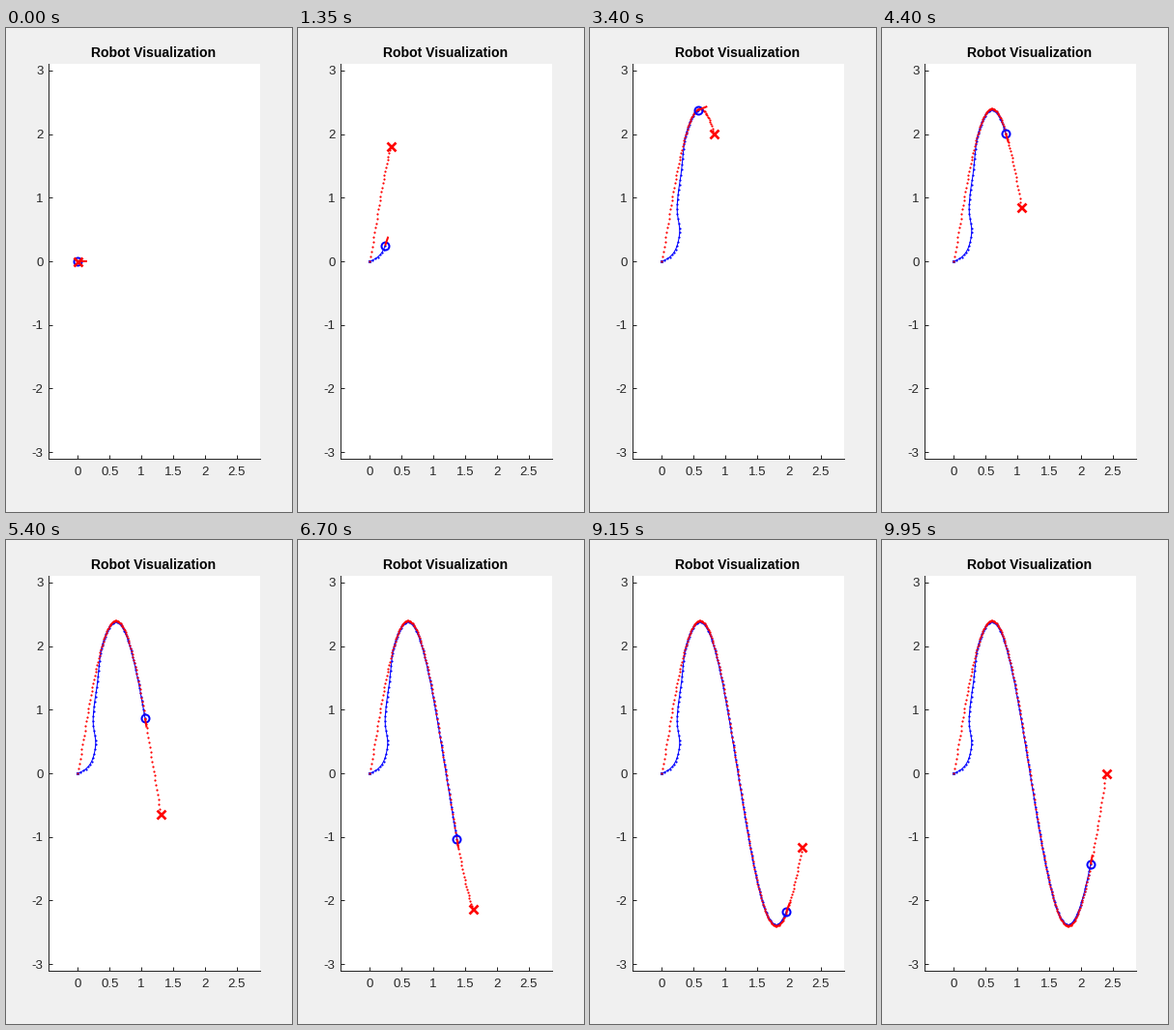
Recreate the animation shown at these times as a matplotlib script. Size 296 px wide and 500 px high, loop 10000 ms.

```python
import numpy as np
import matplotlib.pyplot as plt
from matplotlib.animation import FuncAnimation

W, H, DPI = 296, 500, 100
PX = 72 / DPI  # one pixel in points
FRAMES, INTERVAL = 200, 50
AMP, SPAN = 2.4, 2.4
START, JOIN, LAG = 20, 52, 20.3  # robot starts, reaches the wave, trails by
HEADING = 0.15
SCALE = 65.67  # pixels per unit
LEFT, RIGHT, TOP, BOTTOM = 43.5, 263, 37.4, 444.5
INK = "#262626"

plt.rcParams["font.family"] = "Liberation Sans"


def wave(k, amp=AMP):
    """Sine reference at step k as (x, y) rows."""
    s = np.asarray(k, float) / (FRAMES - 1)
    return np.stack([SPAN * s, amp * np.sin(2 * np.pi * s)], axis=-1)


def hermite(t, knots, pts):
    """Smooth curve through pts at the times in knots."""
    slope = np.gradient(pts, knots, axis=0)
    i = np.clip(np.searchsorted(knots, t, side="right") - 1, 0, len(knots) - 2)
    h = (knots[i + 1] - knots[i])[:, None]
    u = (t - knots[i])[:, None] / h
    return ((2 * u**3 - 3 * u**2 + 1) * pts[i]
            + (u**3 - 2 * u**2 + u) * h * slope[i]
            + (3 * u**2 - 2 * u**3) * pts[i + 1]
            + (u**3 - u**2) * h * slope[i + 1])


def robot_path():
    k = np.arange(FRAMES)
    path = wave(k - LAG, 2.385)
    # swing from the start point onto the wave: time, x, y
    swing = np.array([(20, 0, 0), (22, .085, .04), (24.6, .18, .125),
                      (27, .24, .245), (30, .28, .45), (34.8, .24, .81),
                      (38.5, .26, 1.09), (42, .30, 1.36), (48, .35, 1.835)])
    knots = np.append(swing[:, 0], [JOIN, JOIN + 3])
    pts = np.vstack([swing[:, 1:], path[[JOIN, JOIN + 3]]])
    path[:START] = 0
    path[START:JOIN] = hermite(k[START:JOIN], knots, pts)
    return path


goal = wave(np.arange(FRAMES))
robot = robot_path()
step = np.gradient(robot, axis=0)
angle = np.arctan2(step[:, 1], step[:, 0])
angle[:START] = 0
nose = robot + HEADING * np.stack([np.cos(angle), np.sin(angle)], axis=-1)

fig = plt.figure(figsize=(W / DPI, H / DPI), dpi=DPI, facecolor="#f0f0f0")
ax = fig.add_axes([LEFT / W, 1 - BOTTOM / H,
                   (RIGHT - LEFT) / W, (BOTTOM - TOP) / H], facecolor="white")
ax.set_xlim((LEFT - 74.4) / SCALE, (RIGHT - 74.4) / SCALE)
ax.set_ylim((241 - BOTTOM) / SCALE, (241 - TOP) / SCALE)
ax.set_xticks(np.arange(0, 3, 0.5), ["0", "0.5", "1", "1.5", "2", "2.5"])
ax.set_yticks(range(-3, 4), [str(v) for v in range(-3, 4)])
ax.tick_params(direction="in", length=4 * PX, width=PX, color=INK,
               labelcolor=INK, labelsize=13.3 * PX)
ax.tick_params(axis="x", pad=9 * PX)
ax.tick_params(axis="y", pad=5 * PX)
for side, spine in ax.spines.items():
    spine.set_visible(side in ("left", "bottom"))
    spine.set_linewidth(PX)
    spine.set_color(INK)
fig.text(152.7 / W, 1 - 30 / H, "Robot Visualization", ha="center",
         va="baseline", size=14 * PX, weight="bold", color="black")


def dots(color, **style):
    return ax.plot([], [], color=color, marker="o", ms=2.2 * PX, mew=0,
                   **style)[0]


robot_trail = dots("blue", ls="-", lw=PX)
goal_trail = dots("red", ls="none")
body, = ax.plot([], [], "o", ms=8 * PX, mew=2 * PX, mfc="none", mec="blue")
pointer, = ax.plot([], [], color="red", lw=2 * PX, solid_capstyle="butt")
cross, = ax.plot([], [], "x", ms=9 * PX, mew=2.7 * PX, color="red")
artists = [robot_trail, goal_trail, body, pointer, cross]


def draw(k):
    robot_trail.set_data(*robot[:k + 1].T)
    goal_trail.set_data(*goal[:k + 1].T)
    body.set_data(*robot[k:k + 1].T)
    pointer.set_data(*np.array([robot[k], nose[k]]).T)
    cross.set_data(*goal[k:k + 1].T)
    return artists


anim = FuncAnimation(fig, draw, frames=FRAMES, interval=INTERVAL,
                     repeat=True, repeat_delay=0)
plt.show()
```
